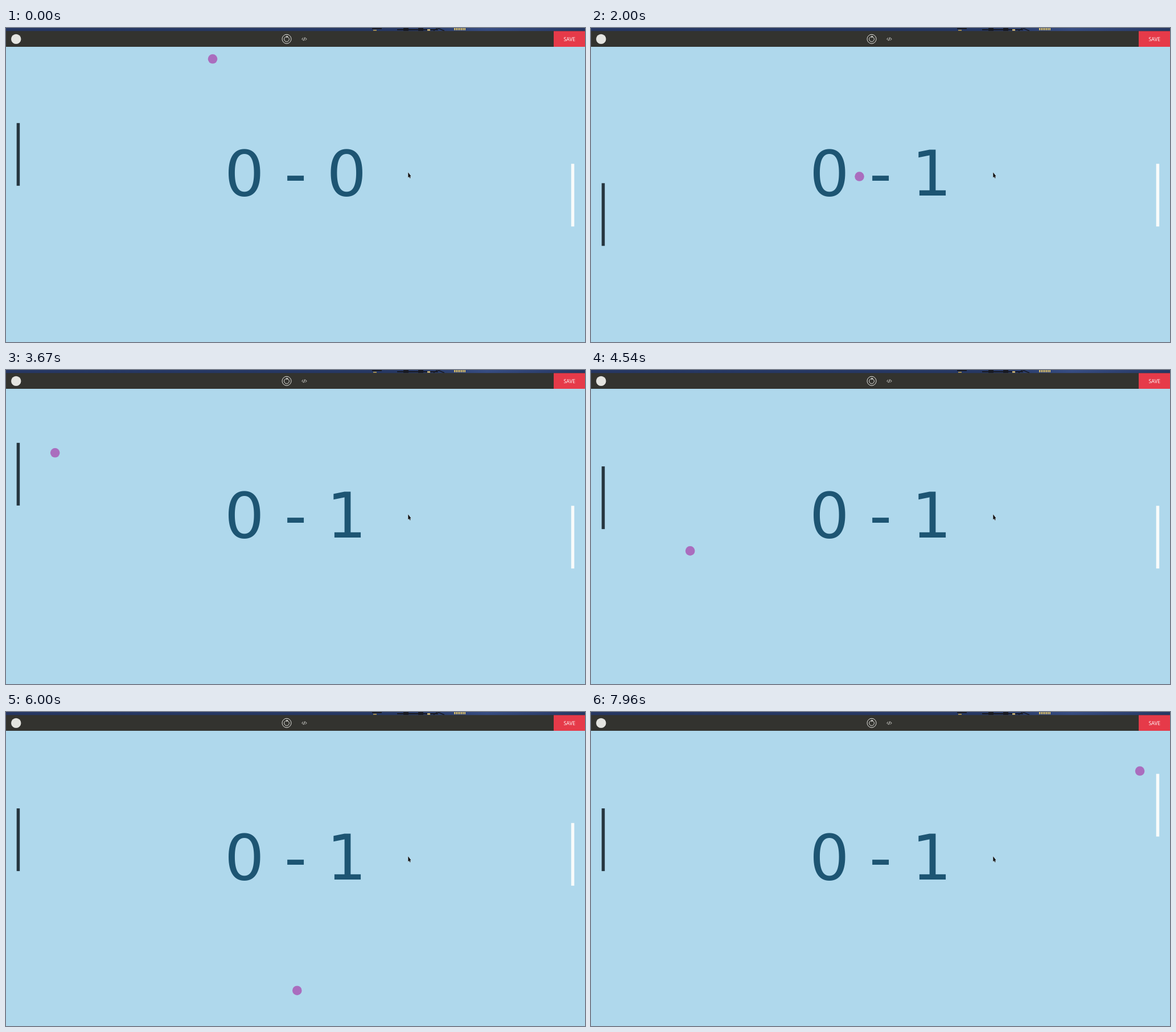
Animation, 1017 px wide and 551 px high, one loop 8000 ms. Source, as an HTML page with a canvas:

```html
<!DOCTYPE html>
<html lang="en">
<head>
<meta charset="utf-8">
<title>Paddle game</title>
<style>
html, body { margin: 0; width: 100%; height: 100%; overflow: hidden; background: #afd8ec; }
canvas { display: block; }
</style>
</head>
<body>
<canvas id="stage" width="1017" height="551"></canvas>
<script>
const ctx = document.getElementById('stage').getContext('2d');
const WIDTH = 1017, HEIGHT = 551, FIELD_TOP = 33;
const LOOP = 8000, FPS = 24;
const BALL_RADIUS = 8.3, PADDLE_WIDTH = 5.5, PADDLE_HEIGHT = 110;
const PADDLE_SPEED = 0.168; // px per ms
const UP = -1, DOWN = 1;
const ICON = '#e4e4e0', ROOF = '#171923';

// The ball turns slightly past the visible top and bottom edges.
const BOUNCE_TOP = 39, BOUNCE_BOTTOM = 546.5;
const MISSED = -BALL_RADIUS, RETURNED = 29;

const serves = [
  { at: 0, x: 363, y: 54.3, vx: -0.196, vy: 0.2285, left: MISSED, score: '0 - 0' },
  { at: 1840, x: 508.5, y: 292, vx: -0.2312, vy: -0.1967, left: RETURNED, score: '0 - 1' }
];

const paddles = [
  { x: 18.7, y: 166.8, color: '#263640', presses: [
    { dir: DOWN, from: 580, to: 1604 }, { dir: UP, from: 1604, to: 2560 },
    { dir: UP, from: 3030, to: 3330 }, { dir: DOWN, from: 4010, to: 4256 }] },
  { x: 992.7, y: 238.3, color: '#f8fbfb', presses: [
    { dir: UP, from: 5235, to: 5747 }, { dir: DOWN, from: 5747, to: 6548 },
    { dir: UP, from: 6897, to: LOOP }] }
];

const clamp = (v, lo, hi) => Math.min(hi, Math.max(lo, v));

function bounce(v, lo, hi) {
  const above = lo + Math.abs(v - lo);
  return hi - Math.abs(hi - above);
}

function ballAt(serve, t) {
  const dt = t - serve.at;
  return {
    x: bounce(serve.x + serve.vx * dt, serve.left, WIDTH - RETURNED),
    y: bounce(serve.y + serve.vy * dt, BOUNCE_TOP, BOUNCE_BOTTOM)
  };
}

function paddleTop({ y, presses }, t) {
  return presses.reduce((top, { dir, from, to }) =>
    top + dir * PADDLE_SPEED * (clamp(t, from, to) - from), y);
}

function rect(color, x, y, w, h) {
  ctx.fillStyle = color;
  ctx.fillRect(x, y, w, h);
}

function disc(color, x, y, r) {
  ctx.fillStyle = color;
  ctx.beginPath();
  ctx.arc(x, y, r, 0, Math.PI * 2);
  ctx.fill();
}

function strokeArc(x, y, r, from, to) {
  ctx.beginPath();
  ctx.arc(x, y, r, from, to);
  ctx.stroke();
}

function polyline(...points) {
  ctx.beginPath();
  points.forEach(([x, y]) => ctx.lineTo(x, y));
}

function label(text, font, color, x, y) {
  ctx.font = font;
  ctx.fillStyle = color;
  ctx.textAlign = 'center';
  ctx.fillText(text, x, y);
}

function drawSkyline() {
  const sky = ctx.createLinearGradient(0, 0, WIDTH, 0);
  sky.addColorStop(0, '#263762');
  sky.addColorStop(0.7, '#263864');
  sky.addColorStop(0.83, '#364c82');
  sky.addColorStop(1, '#263762');
  rect(sky, 0, 0, WIDTH, 6);
  rect(ROOF, 643, 0, 17, 2);
  rect('#a08b50', 645, 3, 6, 2);
  rect(ROOF, 687, 2, 72, 2);
  for (let x = 698; x < 750; x += 26) rect(ROOF, x, 0, 9, 5);
  rect('#c0aa70', 740, 2, 5, 3);
  ctx.strokeStyle = ROOF;
  ctx.lineWidth = 1.5;
  polyline([751, 5], [758, 0], [770, 5]);
  ctx.stroke();
  for (let x = 787; x < 807; x += 3) rect('#d8bd68', x, 0, 2, 4);
}

function drawToolbar() {
  rect('#33332f', 0, 5.3, WIDTH, FIELD_TOP - 5.3);
  disc(ICON, 17.7, 19.4, 8.7);

  ctx.strokeStyle = ICON;
  ctx.lineWidth = 1;
  strokeArc(493, 19.3, 8, 0, Math.PI * 2);
  strokeArc(493, 19.6, 4.4, -1.1, Math.PI * 1.48);
  ctx.fillStyle = ICON;
  polyline([492.7, 13.2], [495.7, 15.3], [492.7, 17.4]);
  ctx.fill();

  for (const side of [-1, 1]) {
    polyline([523.9 + side * 1.9, 17.2], [523.9 + side * 4, 19.4], [523.9 + side * 1.9, 21.6]);
    ctx.stroke();
  }
  polyline([524.9, 16.5], [522.9, 22.3]);
  ctx.stroke();

  rect('#e63a49', 962, 5.5, WIDTH - 962, FIELD_TOP - 5.5);
  label('SAVE', '9px "Open Sans", sans-serif', '#fff', 989.7, 23);
}

function drawCursor() {
  polyline([706.3, 253.3], [706.3, 262.6], [708.2, 260.9], [709.4, 263.7],
    [710.7, 263.1], [709.5, 260.4], [711.6, 260.2]);
  ctx.closePath();
  ctx.strokeStyle = 'rgba(255,255,255,.5)';
  ctx.lineWidth = 1;
  ctx.stroke();
  ctx.fillStyle = '#151515';
  ctx.fill();
}

function draw(t) {
  const serve = serves.filter(s => s.at <= t).pop();
  const ball = ballAt(serve, t);
  rect('#afd8ec', 0, 0, WIDTH, HEIGHT);
  label(serve.score, '110px "DejaVu Sans", sans-serif', '#1d5573', WIDTH / 2, 294);
  for (const paddle of paddles) {
    rect(paddle.color, paddle.x, paddleTop(paddle, t), PADDLE_WIDTH, PADDLE_HEIGHT);
  }
  disc('#aa6dbe', ball.x, ball.y, BALL_RADIUS);
  drawSkyline();
  drawToolbar();
  drawCursor();
}

function frame() {
  // Positions advance once per tick; the 5 ms covers rounded tick times.
  const tick = Math.floor((performance.now() % LOOP + 5) * FPS / 1000);
  draw(tick * 1000 / FPS % LOOP);
  requestAnimationFrame(frame);
}
frame();
</script>
</body>
</html>
```
